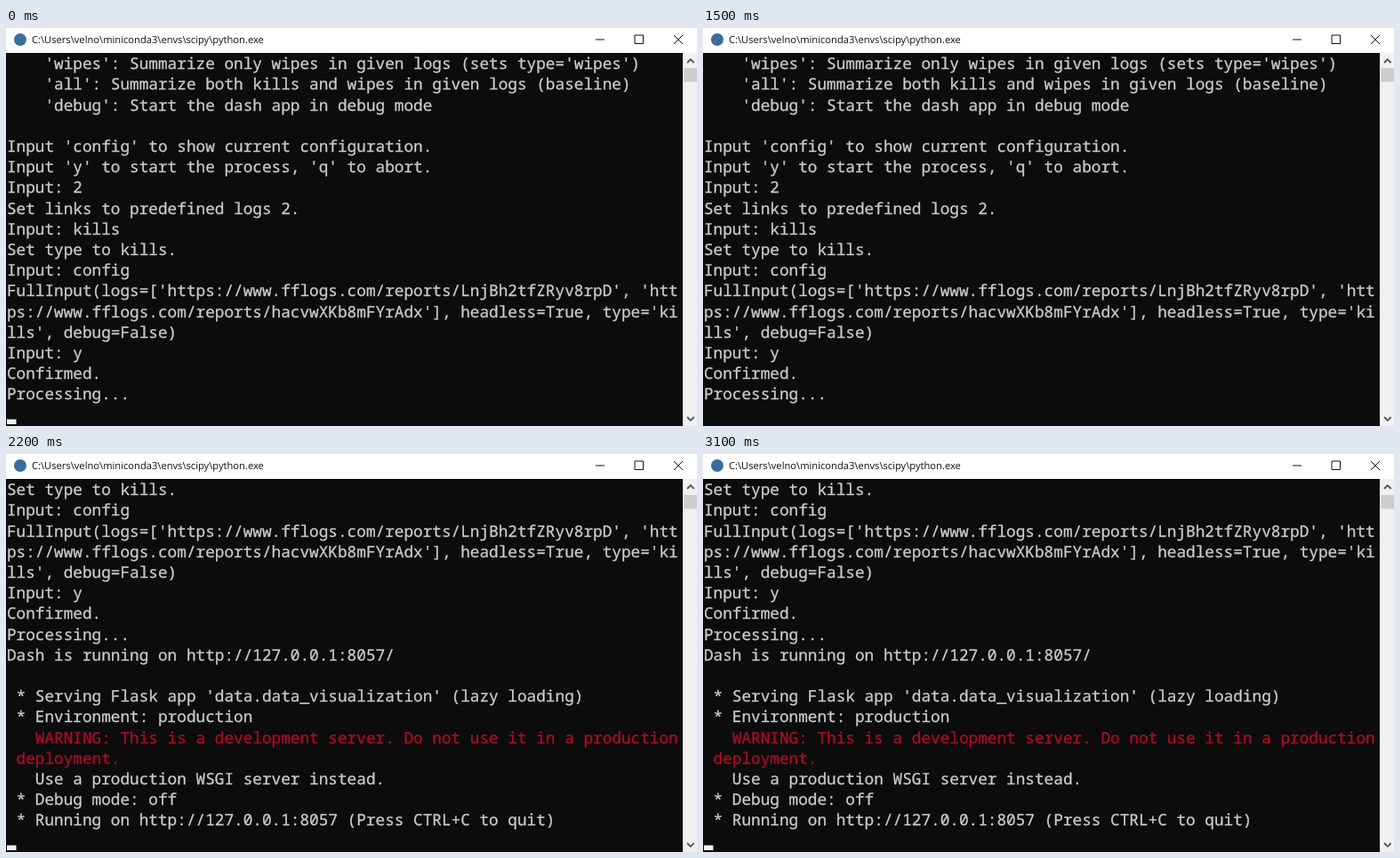
Write an HTML page that moves like this. It is 777 px wide and 447 px high and loops after 3.6 s.

```html
<!DOCTYPE html>
<html lang="en">
<head>
<meta charset="utf-8">
<title>Console</title>
<style>
  html, body { margin: 0; width: 100%; height: 100%; overflow: hidden; background: #0c0c0c; }
  svg { display: block; width: 777px; height: 447px; }
  text { white-space: pre; text-rendering: geometricPrecision; }
  #log text { font: 17.73px "Noto Sans Mono", monospace; fill: #ccc; stroke: #ccc; stroke-width: 0.3; }
  #log .warn { fill: #b00c26; stroke: #b00c26; }
  .title { font: 11.16px "Open Sans", sans-serif; fill: #111; }
  .line { fill: none; stroke: #111; }
  .arrow { fill: none; stroke: #505050; stroke-width: 1.8; }

  #log, .fresh, #cursor, #thumb { animation: 3600ms step-end infinite; }
  #log { animation-name: scroll; }
  .fresh { animation-name: appear; }
  #cursor { animation-name: blink; }
  #thumb { animation-name: nudge; }

  /* Server output arrives at 1900 ms and pushes the log up nine rows. */
  @keyframes scroll { 0% { transform: none; } 52.7778%, 100% { transform: translateY(-208.71px); } }
  @keyframes appear { 0% { opacity: 0; } 52.7778%, 100% { opacity: 1; } }
  @keyframes nudge { 0% { transform: none; } 52.7778%, 100% { transform: translateY(1px); } }
  @keyframes blink {
    0%, 27.7778%, 52.7778%, 86.1111%, 100% { opacity: 1; }
    13.8889%, 41.6667%, 72.2222% { opacity: 0; }
  }
</style>
</head>
<body>
<svg viewBox="0 0 777 447">
  <rect width="777" height="447" fill="#0c0c0c"/>
  <g id="log"></g>
  <rect id="cursor" x="1" y="439.5" width="10.5" height="5.5" fill="#f2f2f2"/>

  <rect x="761" y="28" width="16" height="419" fill="#f0f0f0"/>
  <rect id="thumb" x="762.5" y="45" width="14.5" height="15.5" fill="#cdcdcd"/>
  <path class="arrow" d="M766 39l3.8-3.8 3.8 3.8M766 437l3.8 3.8 3.8-3.8"/>

  <rect width="777" height="28" fill="#fff"/>
  <circle cx="16" cy="13" r="7" fill="#3a6d9c"/>
  <text class="title" x="29" y="17.2">C:\Users\velno\miniconda3\envs\scipy\python.exe</text>
  <path class="line" d="M663 13h10M707 8h9.5v9.5h-9.5zM751 8l10 10M761 8l-10 10"/>
</svg>
<script>
  const before = `    'wipes': Summarize only wipes in given logs (sets type='wipes')
    'all': Summarize both kills and wipes in given logs (baseline)
    'debug': Start the dash app in debug mode

Input 'config' to show current configuration.
Input 'y' to start the process, 'q' to abort.
Input: 2
Set links to predefined logs 2.
Input: kills
Set type to kills.
Input: config
FullInput(logs=['https://www.fflogs.com/reports/LnjBh2tfZRyv8rpD', 'htt
ps://www.fflogs.com/reports/hacvwXKb8mFYrAdx'], headless=True, type='ki
lls', debug=False)
Input: y
Confirmed.
Processing...`.split("\n");

  const after = `Dash is running on http://127.0.0.1:8057/

 * Serving Flask app 'data.data_visualization' (lazy loading)
 * Environment: production
   WARNING: This is a development server. Do not use it in a production
 deployment.
   Use a production WSGI server instead.
 * Debug mode: off
 * Running on http://127.0.0.1:8057 (Press CTRL+C to quit)`.split("\n");

  const log = document.getElementById("log");
  const left = 0.9, rowHeight = 23.19, firstBaseline = 46.3;

  [...before, ...after].forEach((line, row) => {
    const text = document.createElementNS("http://www.w3.org/2000/svg", "text");
    text.setAttribute("x", left);
    text.setAttribute("y", firstBaseline + row * rowHeight);
    if (row >= before.length) text.classList.add("fresh");
    if (/WARNING|deployment/.test(line)) text.classList.add("warn");
    text.textContent = line;
    log.append(text);
  });
</script>
</body>
</html>
```
